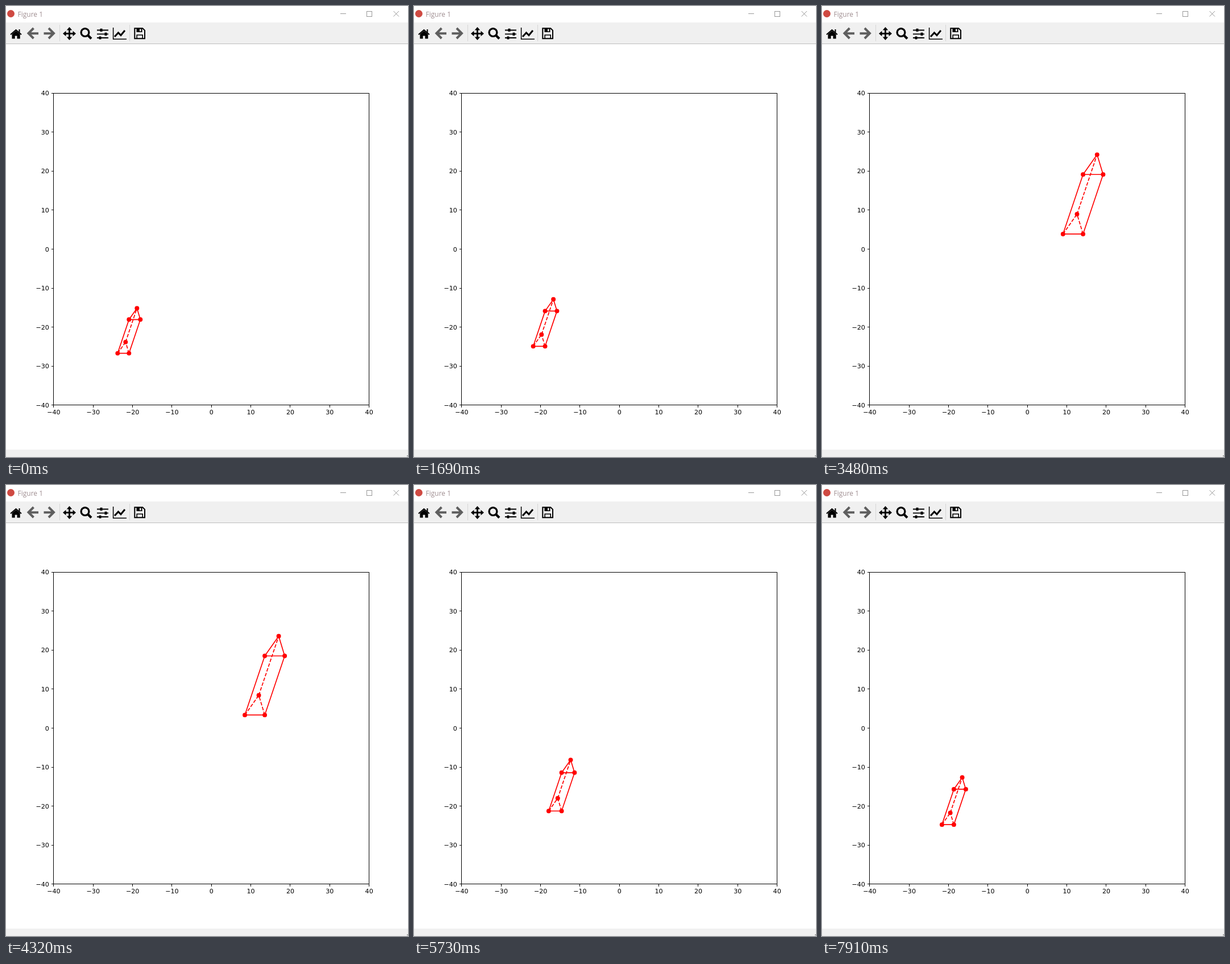
An HTML page for the animation above (8 s loop, 707 by 793 pixels).

```html
<!DOCTYPE html>
<html lang="en">
<head>
<meta charset="utf-8">
<title>Figure 1</title>
<style>
  html, body { margin: 0; width: 100%; height: 100%; overflow: hidden; background: #fff; }
  svg { display: block; width: 707px; height: 793px; }
  .title { font: 12px "Open Sans", "Noto Sans", sans-serif; fill: #a08f92; }
  .label { font: 11.1px "DejaVu Sans", sans-serif; }
  .crisp { shape-rendering: crispEdges; }
  .line { fill: none; stroke: #f00; stroke-width: 1.67; stroke-linejoin: round; }
  .hidden { stroke-dasharray: 6.17 2.67; }
</style>
</head>
<body>
<svg viewBox="0 0 707 793">
  <rect width="707" height="793" fill="#fff"/>

  <!-- title bar -->
  <circle cx="8.5" cy="13.5" r="6.5" fill="#cf4a42"/>
  <text class="title" x="20.5" y="18.5">Figure 1</text>
  <g fill="none" stroke="#999">
    <path class="crisp" d="M588 13.5h10M634.5 9.5h9v9h-9z"/>
    <path d="M681.5 9l9.500 9.500M691 9l-9.500 9.500"/>
  </g>

  <!-- toolbar and status bar -->
  <g class="crisp">
    <rect y="29" width="707" height="37" fill="#f0f0f0"/>
    <rect y="66" width="707" height="1" fill="#bdbdbd"/>
    <path d="M94.500 33v29M217.500 33v29" stroke="#d6d6d6"/>
    <rect y="780" width="707" height="13" fill="#f0f0f0"/>
    <rect x="705" y="790" width="2" height="2" fill="#a0a0a0"/>
  </g>
  <path id="house" d="M17.500 43.500l-7 6v8h5.200v-5h3.800v5h5.200v-8z"/>
  <path d="M8 50.300l9.500-8.200 9.500 8.200M23.500 41v6" fill="none" stroke="#000" stroke-width="2"/>
  <g fill="none" stroke="#5f5f5f" stroke-width="4">
    <path d="M48.500 39l-9 9 9 9M40 48.200h17"/>
    <path d="M75 39l9 9-9 9M83.500 48.200h-17"/>
  </g>
  <path d="M104 48.500h15M111.500 41v15" stroke="#000" stroke-width="3"/>
  <path d="M111.500 37l4.800 5.500h-9.600zM111.500 60l4.800-5.500h-9.600zM100 48.500l5.500-4.800v9.600zM123 48.500l-5.500-4.800v9.600z"/>
  <g fill="none" stroke="#000">
    <circle cx="139" cy="46.500" r="6.900" stroke-width="3.300"/>
    <path d="M144 51.500l6 6" stroke-width="4.200"/>
    <path d="M160 42.500h20M160 49.300h20M160 56h20" stroke-width="1.800"/>
    <path d="M167.500 39.800v5.200M175.500 46.700v5.200M165.500 53.400v5.200" stroke-width="4"/>
    <path d="M188.600 38v20.300H212" stroke-width="1.500"/>
    <path d="M191 54l6.500-7 4.500 4.500 7-8.500" stroke-width="3"/>
    <path d="M226.300 39.200h14l3.700 3.700v14.400h-17.700z" stroke-width="2"/>
    <path d="M230.200 57v-6h10v6" stroke-width="1.600"/>
  </g>
  <path d="M229.500 39h10v7h-10z"/>
  <path d="M235 40.500h2.500v4H235z" fill="#f0f0f0"/>

  <!-- plot -->
  <g id="axes">
    <rect class="crisp" x="83.500" y="153.500" width="555" height="548" fill="none" stroke="#000"/>
  </g>
  <path id="back" class="line hidden"/>
  <path id="front" class="line"/>
  <g id="dots" fill="#f00"></g>
</svg>
<script>
const LOOP = 8000;
const PIVOT = -200 / 3;
const BASE = { x: 14.87, y: 13.86 };
const START_SIZE = 2.8833;
const GROW = 1.06, SHRINK = 0.94;

// Times of the redraws, in units of 10 ms
const TICKS = [
  7, 30, 46, 70, 93, 108, 131, 146, 169, 192, 208, 231, 246, 271, 294, 309, 333, 348, 371, 394,
  409, 432, 449, 472, 495, 511, 534, 550, 573, 596, 611, 635, 650, 674, 697, 714, 737, 753, 776, 791
];

const px = x => 361.3 + 6.934 * x;
const py = y => 427.5 - 6.857 * y;
const byId = id => document.getElementById(id);

function add(parent, name, attrs, text = "") {
  const node = document.createElementNS(parent.namespaceURI, name);
  for (const key in attrs) node.setAttribute(key, attrs[key]);
  node.textContent = text;
  parent.append(node);
  return node;
}

const snap = v => Math.round(v - 0.5) + 0.5;

function drawAxes() {
  const axes = byId("axes");
  for (let v = -40; v <= 40; v += 10) {
    const x = px(v), y = py(v), label = String(v).replace("-", "\u2212");
    add(axes, "path", {
      class: "crisp", stroke: "#000",
      d: `M${snap(x)} 702v4M80 ${snap(y)}h4`
    });
    add(axes, "text", { class: "label", x, y: 718.3, "text-anchor": "middle" }, label);
    add(axes, "text", { class: "label", x: 75.8, y: y + 4, "text-anchor": "end" }, label);
  }
}

// The prism shrinks, grows to its largest, shrinks again and grows once more
function sizeAt(step) {
  let size = START_SIZE;
  for (let n = 0; n < step; n++) {
    const growing = (n >= 4 && n < 20) || n >= 35;
    size *= growing ? GROW : SHRINK;
  }
  return size;
}

function prism(size) {
  const corner = (dx, dy) => [
    px(PIVOT + (BASE.x + dx) * size),
    py(PIVOT + (BASE.y + dy) * size)
  ];
  const triangle = (dx, dy) => [[0, 0], [1, 0], [0.7, 1]].map(([x, y]) => corner(x + dx, y + dy));
  return [...triangle(0, 0), ...triangle(1, 3)];
}

drawAxes();
const dots = Array.from({ length: 6 }, () => add(byId("dots"), "circle", { r: 3.95 }));
let shown = -1;

function draw(step) {
  const points = prism(sizeAt(step));
  const [left, right, rear, topLeft, topRight, apex] = points.map(p => p.map(v => v.toFixed(2)).join(" "));
  byId("front").setAttribute("d",
    `M${left}L${right}L${topRight}L${apex}L${topLeft}ZM${topLeft}L${topRight}`);
  byId("back").setAttribute("d", `M${left}L${rear}M${right}L${rear}M${rear}L${apex}`);
  points.forEach(([x, y], i) => {
    dots[i].setAttribute("cx", x);
    dots[i].setAttribute("cy", y);
  });
}

const began = performance.now();
function frame() {
  const time = (performance.now() - began) % LOOP;
  const step = TICKS.filter(tick => tick * 10 <= time).length;
  if (step !== shown) draw(shown = step);
  requestAnimationFrame(frame);
}
frame();
</script>
</body>
</html>
```
